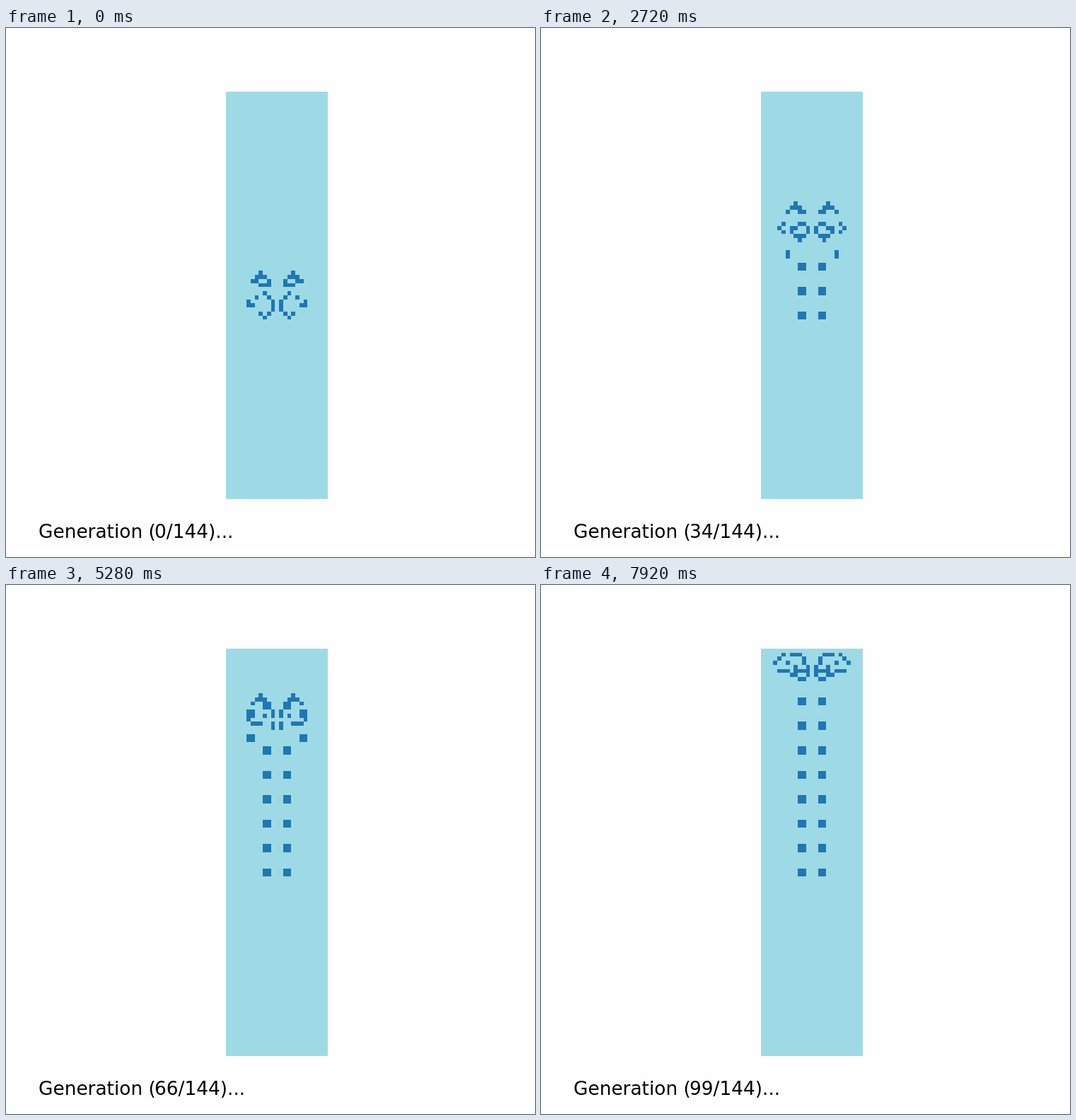
Write an HTML page that moves like this. It is 748x748 px and loops after 8 s.

```html
<!DOCTYPE html>
<html lang="en">
<head>
<meta charset="utf-8">
<title>Game of Life puffer</title>
<style>
  html, body { margin: 0; width: 100%; height: 100%; overflow: hidden; background: #fefefe; }
  svg { display: block; }
  text { font: 26.39px "DejaVu Sans", sans-serif; fill: #000; }
</style>
</head>
<body>
<svg width="748" height="748" viewBox="0 0 748 748">
  <rect x="311" y="90" width="144" height="576" fill="#9edae5" shape-rendering="crispEdges"/>
  <path id="cells" fill="#1f77b4" shape-rendering="crispEdges"/>
  <text x="46" y="721">Generation (</text>
  <text id="count" x="210" y="721"></text>
</svg>
<script>
const COLS = 25, ROWS = 100, STEPS = 100, STEP_MS = 80, CELL = 5.76;
const START = { row: 44, col: 5 };
// Run-length pattern: b = dead, o = alive, $ = next row
const PUFFER = '3bo7bo$2b3o5b3o$b2o2bo3bo2b2o$3b3o3b3o2$4bo5bo$2bo2bo3bo2bo$' +
  'o5bobo5bo$2o4bobo4b2o$6bobo$3bobo3bobo$4bo5bo!';

const edgeX = c => Math.round(311.2 + c * CELL);
const edgeY = r => Math.round(89.8 + r * CELL);
const emptyGrid = () => Array.from({ length: ROWS }, () => new Uint8Array(COLS));

function parse(rle) {
  const grid = emptyGrid();
  let { row, col } = START;
  for (const [, digits, tag] of rle.matchAll(/(\d*)([bo$])/g)) {
    const n = +digits || 1;
    if (tag === '$') {
      row += n;
      col = START.col;
    } else {
      if (tag === 'o') grid[row].fill(1, col, col + n);
      col += n;
    }
  }
  return grid;
}

// Everything beyond the edges stays dead.
function neighbours(grid, row, col) {
  let sum = -grid[row][col];
  for (let r = row - 1; r <= row + 1; r++)
    for (let c = col - 1; c <= col + 1; c++) sum += grid[r]?.[c] ?? 0;
  return sum;
}

function evolve(grid) {
  const next = emptyGrid();
  for (let r = 0; r < ROWS; r++)
    for (let c = 0; c < COLS; c++) {
      const n = neighbours(grid, r, c);
      next[r][c] = n === 3 || (n === 2 && grid[r][c]) ? 1 : 0;
    }
  return next;
}

function outline(grid) {
  let d = '';
  grid.forEach((line, r) => line.forEach((alive, c) => {
    if (alive) d += `M${edgeX(c)} ${edgeY(r)}H${edgeX(c + 1)}V${edgeY(r + 1)}H${edgeX(c)}Z`;
  }));
  return d;
}

const outlines = [];
for (let grid = parse(PUFFER); outlines.length < STEPS; grid = evolve(grid))
  outlines.push(outline(grid));

const cells = document.getElementById('cells');
const count = document.getElementById('count');
const start = performance.now();
let shown = -1;

function draw(now) {
  const gen = Math.floor(Math.max(0, now - start) / STEP_MS) % STEPS;
  if (gen !== shown) {
    shown = gen;
    cells.setAttribute('d', outlines[gen]);
    count.textContent = `${gen}/144)...`;
  }
  requestAnimationFrame(draw);
}
draw(start);
</script>
</body>
</html>
```
